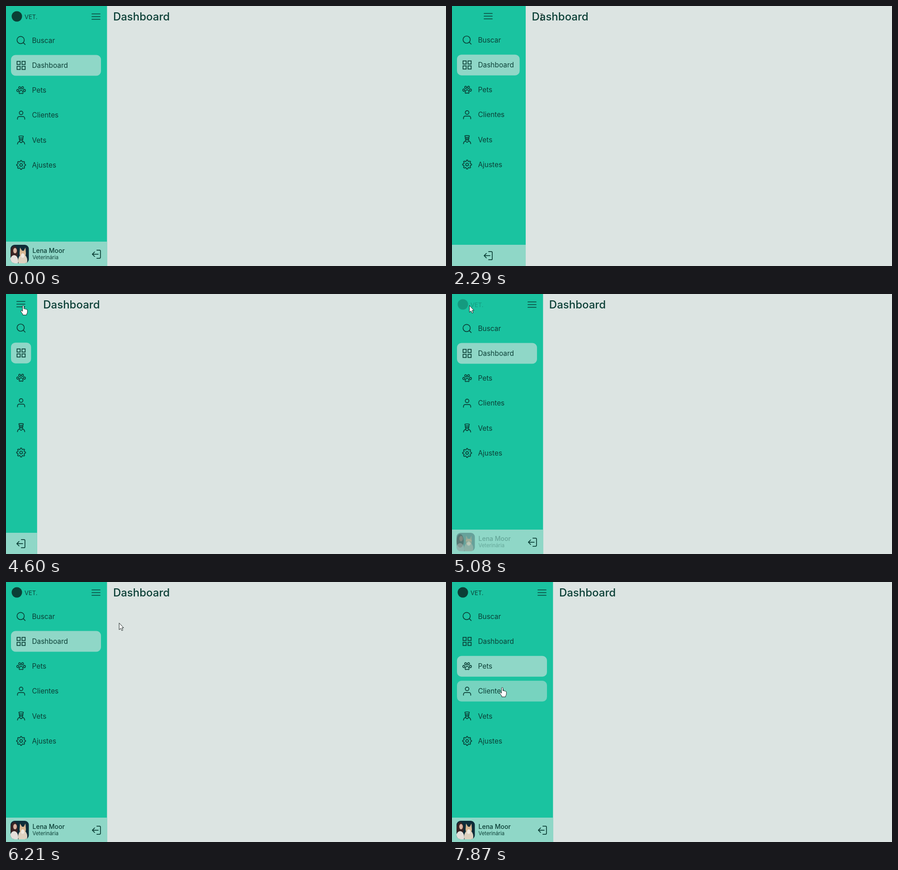
These frames come from a looping animation (973x576 px, 8 s). An HTML page with a canvas:

```html
<!DOCTYPE html>
<html lang="pt">
<head>
<meta charset="utf-8">
<title>Dashboard</title>
<style>
  html, body { margin: 0; width: 100%; height: 100%; overflow: hidden; background: #dce4e2; }
  canvas { display: block; width: 973px; height: 576px; }
</style>
</head>
<body>
<canvas id="stage" width="973" height="576"></canvas>
<script>
const ctx = document.getElementById('stage').getContext('2d');
const LOOP = 8000, OPEN = 223.4, CLOSED = 68.8;
const COLLAPSE = 2170, EXPAND = 4800, SELECT = 7090;
const GREEN = '#1ac3a0', PALE = '#8fd7c7', INK = '#0b3f36', PAGE = '#dce4e2';
const FONT = 'Inter, sans-serif';

const clamp = v => Math.max(0, Math.min(1, v));
const ramp = (t, start, length) => clamp((t - start) / length);
const mix = (a, b, k) => a + (b - a) * k;

// The standard CSS "ease" curve.
function ease(p) {
  let lo = 0, hi = 1;
  const bez = (s, a, b) => 3 * a * s * (1 - s) ** 2 + 3 * b * s * s * (1 - s) + s ** 3;
  for (let i = 0; i < 20; i++) {
    const mid = (lo + hi) / 2;
    if (bez(mid, .25, .25) < p) lo = mid; else hi = mid;
  }
  return bez((lo + hi) / 2, .1, 1);
}

function gearPath() {
  const p = new Path2D('M15 12a3 3 0 1 1-6 0a3 3 0 1 1 6 0');
  for (let i = 0; i <= 160; i++) {
    const a = i / 160 * Math.PI * 2;
    const r = 8.7 + 1.35 * Math.tanh(1.9 * Math.cos(8 * a));
    p[i ? 'lineTo' : 'moveTo'](12 + r * Math.sin(a), 12 - r * Math.cos(a));
  }
  return p;
}

function pawPath() {
  const p = new Path2D('M12 11.6c2 0 2.6 1.8 3.4 3.4c.9 1.8 1.6 4.5-.6 4.5c-1.2 0-1.7-.8-2.8-.8s-1.6.8-2.8.8c-2.2 0-1.5-2.7-.6-4.5c.8-1.6 1.4-3.4 3.4-3.4');
  for (const side of [-1, 1]) {
    for (const [dx, y] of [[7.4, 12.5], [3.2, 6.4]]) {
      const toe = new Path2D();
      toe.ellipse(12 + side * dx, y, 2.1, 2.6, side * .15, 0, Math.PI * 2);
      p.addPath(toe);
    }
  }
  return p;
}

const icons = {
  menu: new Path2D('M3 6h18M3 12h18M3 18h18'),
  search: new Path2D('M19 11a8 8 0 1 1-16 0a8 8 0 1 1 16 0M21 21l-4.3-4.3'),
  grid: new Path2D('M3 3h7v7h-7zM14 3h7v7h-7zM14 14h7v7h-7zM3 14h7v7h-7z'),
  paw: pawPath(),
  user: new Path2D('M20 21v-2a4 4 0 0 0-4-4H8a4 4 0 0 0-4 4v2M16 7a4 4 0 1 1-8 0a4 4 0 1 1 8 0'),
  vet: new Path2D('M7 3.5q5-1.5 10 0l-1 3.5H8zM8 7v2c0 5 8 5 8 0V7M8 10h8M9 13l-1 2q-3.8 2-4 6M15 13l1 2q3.8 2 4 6M8 15l4 3l4-3'),
  gear: gearPath(),
  exit: new Path2D('M13 3h6a2 2 0 0 1 2 2v14a2 2 0 0 1-2 2h-6M8 7l-5 5l5 5M3 12h13')
};
const items = [
  ['search', 'Buscar'], ['grid', 'Dashboard'], ['paw', 'Pets'],
  ['user', 'Clientes'], ['vet', 'Vets'], ['gear', 'Ajustes']
];

const arrow = new Path2D('M.5.5V15.5L4 12.3L6.4 17.5L8.8 16.4L6.5 11.3H10.5Z');
const hand = new Path2D('M-1.5 1.5q1.7-2 3.2 0V8q2-1 3 .5q2-.8 2.6.8q1.8-.3 2 1.7v4q0 2.5-1.8 4.5v2H-1v-2L-5 14q-1-2 .8-2.6q1.4 0 2.7 2z');
const beam = new Path2D('M-3-7.5h2l1 1l1-1h2M0-6.5v13M-3 7.5h2l1-1l1 1h2');

// Pointer stops: time, x, y.
const stops = [
  [260, 917, 570], [520, 680, 350], [900, 372, 127], [1100, 372, 127],
  [1380, 237, 43], [1640, 192, 18], [1880, 198, 24.5], [2740, 198, 24.5],
  [3270, 262, 274], [3470, 262, 274], [4000, 110, 60], [4240, 48, 13],
  [4420, 32, 18], [4600, 38, 25], [5080, 38, 25], [5400, 50, 27],
  [5640, 142, 38], [5900, 215, 78], [6210, 249, 90], [6420, 395, 150],
  [6490, 400, 165], [6650, 290, 215], [6780, 209, 228], [6960, 140, 209],
  [7190, 100, 190], [7520, 100, 190], [7800, 111, 233], [8000, 111, 233]
];

function pointerAt(t) {
  const i = stops.findIndex(s => s[0] > t);
  const [t0, x0, y0] = stops[i - 1], [t1, x1, y1] = stops[i];
  const k = (t - t0) / (t1 - t0);
  return [mix(x0, x1, k), mix(y0, y1, k)];
}

function sidebarWidth(t) {
  return t < EXPAND
    ? mix(OPEN, CLOSED, ease(ramp(t, COLLAPSE, 500)))
    : mix(CLOSED, OPEN, ease(ramp(t, EXPAND, 500)));
}

function box(x, y, w, h, r, color) {
  ctx.fillStyle = color;
  ctx.beginPath();
  ctx.roundRect(x, y, w, h, r);
  ctx.fill();
}

function disc(x, y, rx, ry, color) {
  ctx.fillStyle = color;
  ctx.beginPath();
  ctx.ellipse(x, y, rx, ry, 0, 0, Math.PI * 2);
  ctx.fill();
}

function text(str, x, y, size, weight = 400) {
  ctx.font = `${weight} ${size}px ${FONT}`;
  ctx.fillStyle = INK;
  ctx.fillText(str, x, y);
}

function icon(name, cx, cy, weight = 1.7) {
  ctx.save();
  ctx.translate(cx - 12, cy - 12);
  ctx.strokeStyle = INK;
  ctx.lineWidth = weight;
  ctx.lineCap = ctx.lineJoin = name === 'grid' ? 'miter' : 'round';
  ctx.stroke(icons[name]);
  ctx.restore();
}

function portrait() {
  ctx.save();
  ctx.beginPath();
  ctx.roundRect(10, 529, 40.5, 41, 9);
  ctx.clip();
  box(10, 529, 41, 41, 0, '#0e2c38');
  disc(18, 547, 8, 15, '#3b2424');
  disc(20, 542, 4, 6, '#d9b3a0');
  disc(18, 565, 9, 13, '#e4dfda');
  disc(37, 564, 10, 14, '#ded2c0');
  disc(37, 549, 7, 7, '#d8b893');
  ctx.beginPath();
  ctx.moveTo(30, 548); ctx.lineTo(31, 535); ctx.lineTo(36, 543);
  ctx.lineTo(39, 543); ctx.lineTo(43, 535); ctx.lineTo(44, 548);
  ctx.fill();
  disc(37, 553, 4, 5, '#f0eae0');
  ctx.restore();
}

function pillLevel(i, t) {
  const fade = (on, off) => ramp(t, on, 150) - ramp(t, off, 150);
  if (i === 1) return 1 - ramp(t, SELECT, 100);
  if (i === 2) return mix(.8 * ramp(t, 6960, 130), 1, ramp(t, SELECT, 100));
  if (i === 3) return .8 * (fade(6780, 6960) + ramp(t, 7700, 150));
  return 0;
}

function drawPointer(t, width, menuX, menuY) {
  const [x, y] = pointerAt(t);
  const overMenu = Math.hypot(x - menuX, y - menuY) < 13;
  const row = (y - 53.5) / 55.2;
  const overItem = x > 11 && x < width - 13 && row > 0 && row < 6 && row % 1 < .84;
  const overTitle = x > width + 12 && x < width + 128 && y > 10 && y < 38;
  ctx.save();
  ctx.translate(x, y);
  ctx.lineWidth = 1;
  ctx.lineJoin = 'round';
  ctx.strokeStyle = '#17211f';
  ctx.fillStyle = '#fff';
  if (overTitle) {
    ctx.stroke(beam);
  } else {
    const shape = overMenu || overItem ? hand : arrow;
    ctx.fill(shape);
    ctx.stroke(shape);
  }
  ctx.restore();
}

function draw(t) {
  const width = sidebarWidth(t);
  const open = t < COLLAPSE || t >= EXPAND;
  const shown = t < COLLAPSE ? 1 : ramp(t, EXPAND, 900);
  const menuX = open ? width - 24.4 : (width - 3) / 2;
  const menuY = open ? 23.5 : 22.5;
  const footY = open ? 522 : 529;

  box(0, 0, 973, 576, 0, PAGE);
  text('Dashboard', width + 13.5, 32, 24, 500);
  box(0, 0, width, 576, 0, GREEN);
  box(0, footY, width, 576 - footY, 0, PALE);

  items.forEach(([name, label], i) => {
    const y = (open ? 76.4 : 75.5) + i * 55.15;
    ctx.globalAlpha = pillLevel(i, t);
    box(11, y - 23, width - 24.4, 46, 10, PALE);
    ctx.globalAlpha = 1;
    icon(name, 33.4, y);
    ctx.save();
    ctx.beginPath();
    ctx.rect(11, y - 23, width - 24.4, 46);
    ctx.clip();
    text(label, 57.5, y + 5.5, 15.4);
    ctx.restore();
  });

  icon('menu', menuX, menuY);
  icon('exit', open ? width - 23.5 : (width - 3) / 2, open ? 549.8 : 553.2);

  if (open) {
    ctx.globalAlpha = shown;
    disc(24, 23, 11.5, 11.5, INK);
    text('VET.', 41, 29, 13);
    portrait();
    text('Lena Moor', 58.5, 547, 14, 500);
    text('Veterinária', 58.5, 561, 11.3);
    ctx.globalAlpha = 1;
  }
  if (t >= stops[0][0]) drawPointer(t, width, menuX, menuY);
}

const begin = performance.now();
function tick() {
  draw((performance.now() - begin) % LOOP);
  requestAnimationFrame(tick);
}
tick();
</script>
</body>
</html>
```
